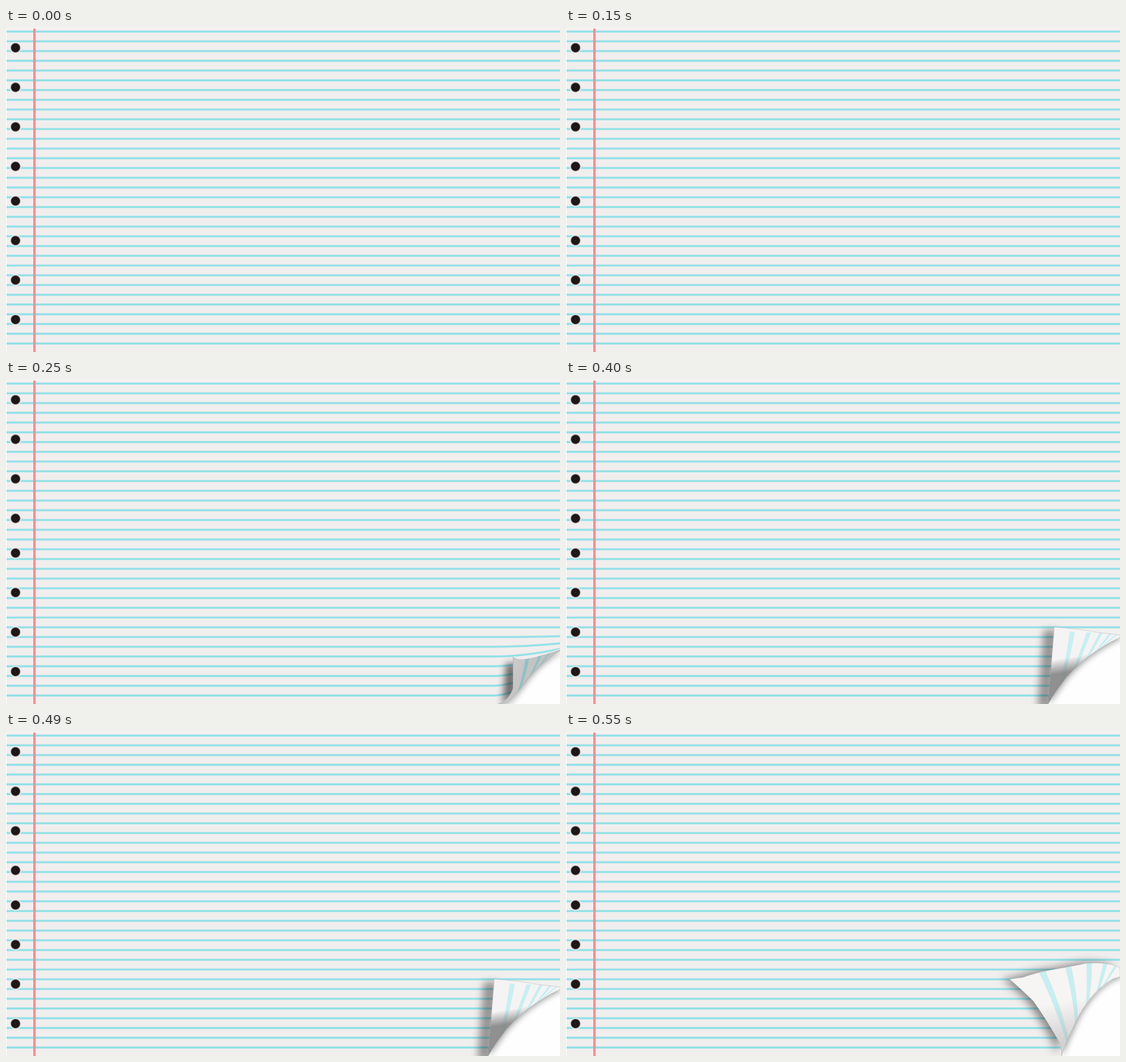
Write an HTML page with a canvas that moves like this. It is 978x573 px and loops after 0.7 s.

```html
<!DOCTYPE html>
<html lang="en">
<head>
<meta charset="utf-8">
<title>Page curl</title>
<style>
  html, body { margin: 0; width: 100%; height: 100%; overflow: hidden; background: #fdfefd; }
  canvas { display: block; }
</style>
</head>
<body>
<canvas id="stage" width="978" height="573"></canvas>
<script>
const W = 978, H = 573, LOOP = 700;
const LINES = 33, GAP = 17.24;
const PAPER = '#f1eeee', UNDER = '#fdfefd';
const ctx = document.getElementById('stage').getContext('2d');

const mix = (a, b, u) => a + (b - a) * u;
const mixPoint = (p, q, u) => p.map((v, i) => mix(v, q[i], u));

function fill(path, style) {
  ctx.fillStyle = style;
  ctx.fill(path);
}

function stroke(path, style, width) {
  ctx.strokeStyle = style;
  ctx.lineWidth = width;
  ctx.stroke(path);
}

function fade(x0, y0, x1, y1, from, to) {
  const g = ctx.createLinearGradient(x0, y0, x1, y1);
  g.addColorStop(0, from);
  g.addColorStop(1, to);
  return g;
}

function inside(path, draw) {
  ctx.save();
  ctx.clip(path);
  draw();
  ctx.restore();
}

// Soft copy of a shape, without the shape itself
function shadow(path, dx, dy, blur, alpha) {
  ctx.save();
  ctx.shadowColor = `rgba(40,40,40,${alpha})`;
  ctx.shadowBlur = blur;
  ctx.shadowOffsetX = dx + 2 * W;
  ctx.shadowOffsetY = dy;
  ctx.translate(-2 * W, 0);
  fill(path, '#000');
  ctx.restore();
}

// Ruled lines on the back: tops crowd together to the right, stripes taper to the foot
function fan(count, top, foot, width, bow, color) {
  const crowd = k => 1 - .75 ** k;
  for (let k = 0; k < count; k++) {
    const u = k / (count - 1);
    const [x0, y0] = mixPoint(...top, crowd(k) / crowd(count - 1));
    const [x1, y1] = mixPoint(...foot, u);
    const w = width * (1 - .55 * u), cx = (x0 + x1) / 2 + bow * (1 - u), cy = (y0 + y1) / 2;
    const p = new Path2D();
    p.moveTo(x0 - w / 2, y0);
    p.quadraticCurveTo(cx - w * .4, cy, x1 - w / 5, y1);
    p.lineTo(x1 + w / 5, y1);
    p.quadraticCurveTo(cx + w * .4, cy, x0 + w / 2, y0);
    fill(p, color);
  }
}

function drawHole(x, y) {
  const g = ctx.createRadialGradient(x, y, 0, x, y, 11);
  g.addColorStop(0, '#2c2526');
  g.addColorStop(.2, '#1c1716');
  g.addColorStop(.64, '#1c1716');
  g.addColorStop(.84, '#f4f1f0');
  g.addColorStop(1, 'rgba(246,244,243,0)');
  ctx.fillStyle = g;
  ctx.fillRect(x - 11, y - 11, 22, 22);
}

function drawPaper(lifted) {
  ctx.fillStyle = UNDER;
  ctx.fillRect(0, 0, W, H);
  ctx.fillStyle = PAPER;
  ctx.fillRect(1, 1, W, H);

  const margin = new Path2D('M50.2 1V573');
  stroke(margin, '#f7f2f1', 8);
  for (let i = 0; i < LINES; i++) {
    const y = 6.3 + i * GAP;
    const rise = lifted ? 1.5 * Math.max(0, i - 25) ** 2 : 0;
    const p = new Path2D();
    p.moveTo(1, y);
    p.lineTo(860, y);
    p.quadraticCurveTo(915, y, W, y - rise);
    stroke(p, 'rgba(170,230,235,.5)', 4.6);
    stroke(p, '#8fe0e8', 2.8);
  }
  stroke(margin, 'rgba(243,136,138,.92)', 4.4);

  for (let i = 0; i < 8; i++) {
    drawHole(16.8, 35 + 271 * Math.floor(i / 4) + 69.9 * (i % 4));
  }
}

// Bare corner, with the flap's shadow falling on it, then the flap
function drawFlap(flap, under, color, details) {
  fill(under, UNDER);
  inside(under, () => shadow(flap, 2, 2, 11, .45));
  fill(flap, color);
  inside(flap, details);
  stroke(flap, 'rgba(130,130,130,.35)', .8);
}

function curlSmall() {
  const under = new Path2D('M978 477Q940 496 916 529Q894 563 880 573H978Z');
  const flap = new Path2D('M895 489Q906 496 926 491Q953 485 978 476V479Q943 499 919 530Q899 558 886 571L868 573Q888 567 895 545Z');
  shadow(new Path2D('M883 501H900V552L882 573H877Z'), 0, 0, 13, .7);
  drawFlap(flap, under, fade(895, 515, 930, 535, '#cac9c9', '#c0c0c0'), () => {
    fan(3, [[921, 488], [963, 478]], [[904, 553], [940, 508]], 7, 4, '#91c0c6');
  });
  stroke(new Path2D('M896 489Q907 496 926 491Q953 485 978 476'), '#f3f1f0', 1.5);
}

function curlMiddle() {
  const under = new Path2D('M978 454Q910 490 878 532Q861 556 851 573H978Z');
  const flap = new Path2D('M862 437Q907 440 936 446L978 451V455Q922 481 884 525Q865 549 851 573Z');
  shadow(new Path2D('M843 442H868L858 580H832Z'), 0, 0, 13, .45);
  drawFlap(flap, under, '#f5f3f3', () => {
    fan(5, [[894, 445], [973, 449]], [[872, 546], [948, 470]], 9, 3, '#c8eff2');
    ctx.fillStyle = fade(868, 494, 872, 519, 'rgba(125,125,125,0)', 'rgba(125,125,125,.84)');
    ctx.fillRect(845, 480, 133, 93);
  });
}

function curlLarge() {
  const under = new Path2D('M978 432Q938 449 912 491Q885 535 875 573H978Z');
  const flap = new Path2D('M783 437L806 434Q831 425 860 420Q895 414 918 409Q947 407 967 412L978 418V433Q960 435 935 460Q907 491 893 528Q880 553 875 573Q875 555 867 542Q847 507 825 476Q809 460 783 437Z');
  shadow(flap, -12, -1, 15, .52);
  drawFlap(flap, under, '#f7f4f4', () => {
    fan(5, [[834, 410], [974, 408]], [[886, 548], [950, 447]], 13, 8, '#c8eef1');
    ctx.fillStyle = fade(860, 480, 872, 548, 'rgba(160,160,160,0)', 'rgba(160,160,160,.42)');
    ctx.fillRect(780, 470, 198, 103);
  });
}

// Each pose is held until its end time
const poses = [
  { until: 250 },
  { until: 400, curl: curlSmall, lifted: true },
  { until: 550, curl: curlMiddle },
  { until: LOOP, curl: curlLarge }
];

let shown, start;
function tick(now) {
  start ??= now;
  const t = (now - start) % LOOP;
  const pose = poses.find(p => t < p.until);
  if (pose !== shown) {
    shown = pose;
    drawPaper(pose.lifted);
    if (pose.curl) pose.curl();
  }
  requestAnimationFrame(tick);
}
requestAnimationFrame(tick);
</script>
</body>
</html>
```
